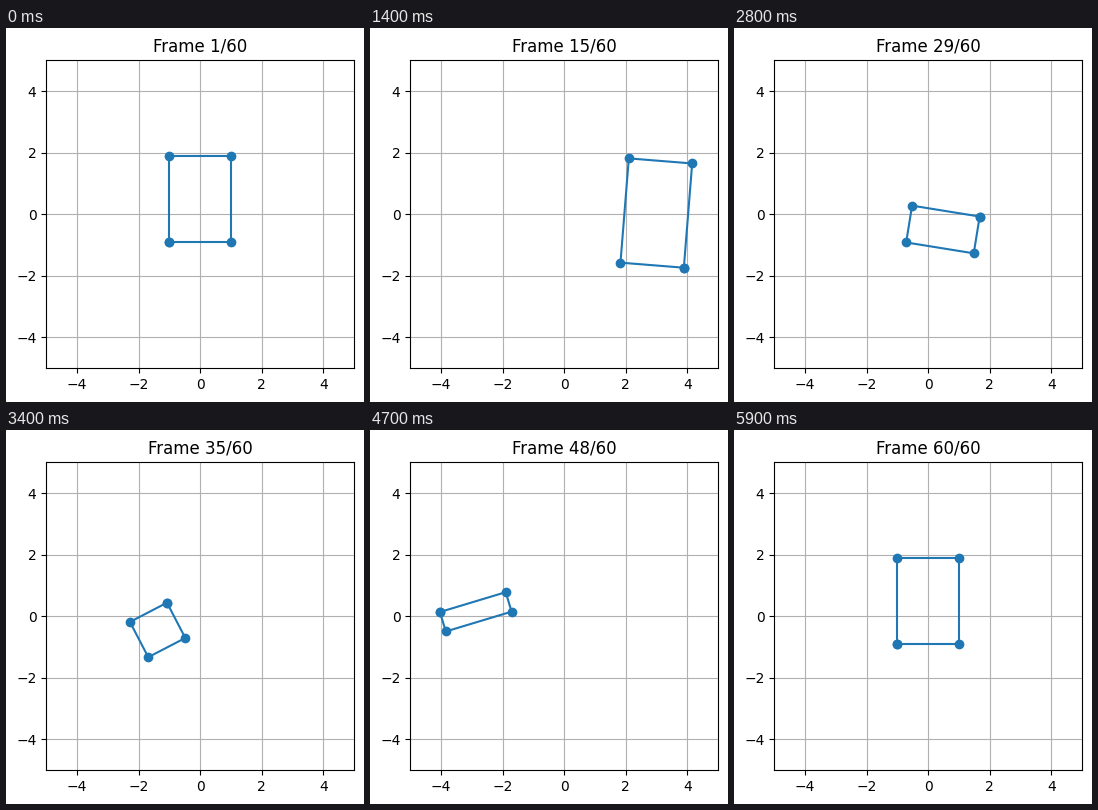
Recreate the animation shown at these times as a matplotlib script. Size 358 by 374 pixels, loop 6 s.

```python
import numpy as np
import matplotlib.pyplot as plt
from matplotlib.animation import FuncAnimation

WIDTH, HEIGHT, DPI = 358, 374, 100
FRAMES, INTERVAL = 60, 100
LEFT, BOTTOM, SIDE = 40.22, 33.72, 308

# Unit square, closed back to its first corner
SQUARE = np.array([[-1, 1, 1, -1, -1], [-1, -1, 1, 1, -1]]) / 2

fig = plt.figure(figsize=(WIDTH / DPI, HEIGHT / DPI), dpi=DPI)
ax = fig.add_axes([LEFT / WIDTH, BOTTOM / HEIGHT, SIDE / WIDTH, SIDE / HEIGHT])
ax.set(xlim=(-5, 5), ylim=(-5, 5))
ax.set_xticks(range(-4, 5, 2))
ax.set_yticks(range(-4, 5, 2))
ax.grid(True)
outline, = ax.plot([], [], "o-", color="tab:blue")
title = ax.set_title("")


def corners(angle):
    """Rectangle that orbits an ellipse, turns and changes its sides."""
    s, c = np.sin(angle), np.cos(angle)
    size = np.array([[2 + 1.4 * s], [2 + 0.8 * c]])
    center = np.array([[3 * s], [0.5 * c]])
    turn = np.array([[c, -s], [s, c]])
    return turn @ (SQUARE * size) + center


def update(i):
    outline.set_data(*corners(2 * np.pi * i / (FRAMES - 1)))
    title.set_text(f"Frame {i + 1}/{FRAMES}")
    return outline, title


anim = FuncAnimation(fig, update, frames=FRAMES, interval=INTERVAL,
                     repeat=True, repeat_delay=0)
plt.show()
```
